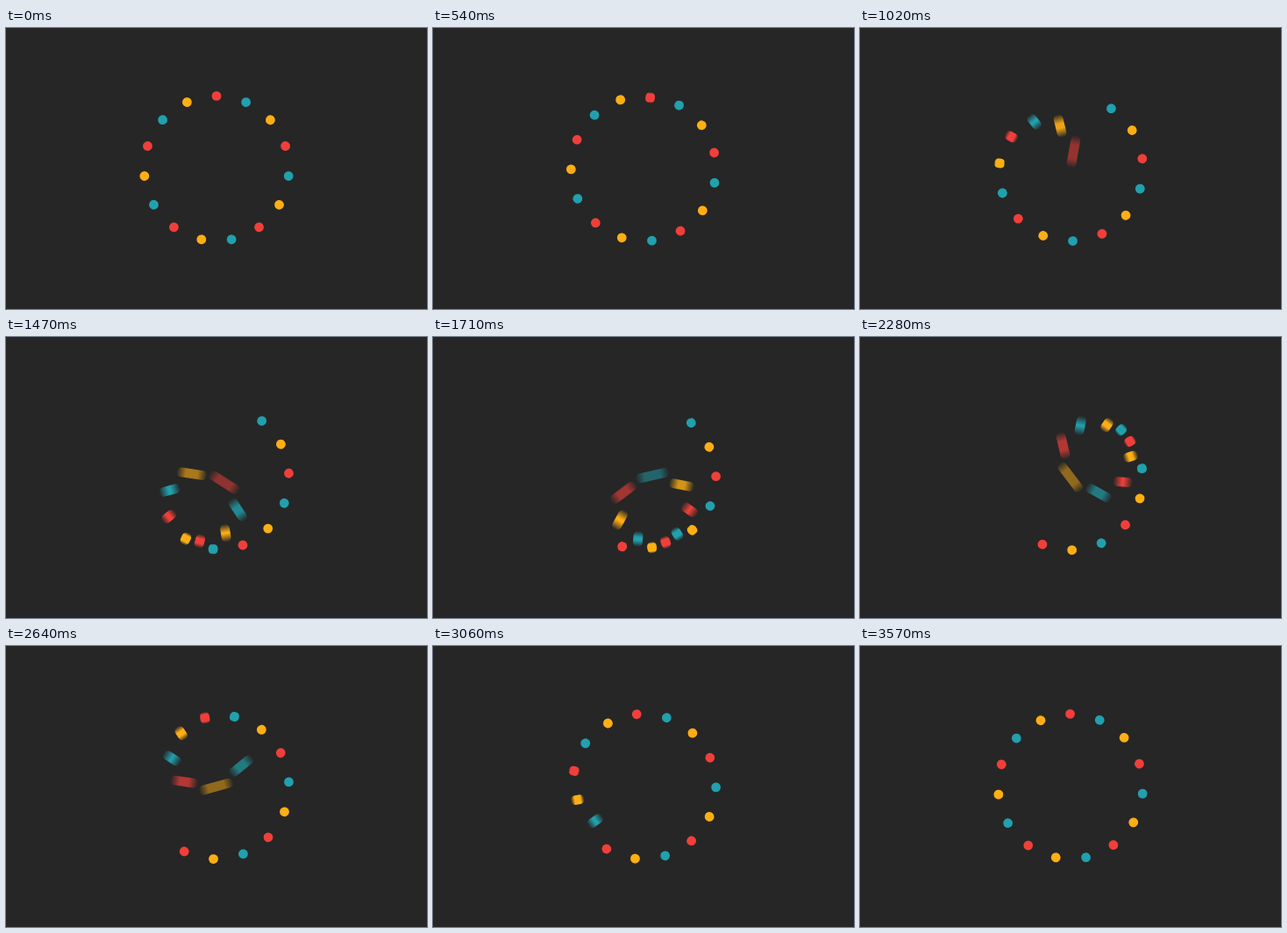
Recreate the animation shown at these times as an HTML page with a canvas. Size 480 by 320 pixels, loop 3.6 s.

```html
<!DOCTYPE html>
<html lang="en">
<head>
<meta charset="utf-8">
<title>Dot ring</title>
<style>
  html, body { margin: 0; width: 100%; height: 100%; overflow: hidden; background: #262626; }
  canvas { display: block; width: 480px; height: 320px; }
</style>
</head>
<body>
<canvas id="stage"></canvas>
<script>
const LOOP = 3600, COUNT = 15, RING = 82.6, DOT = 5.4;
const FIRST = 1080, STAGGER = 120, CROSSING = 1340, EASE = 0.655;
const SHUTTER = 84, GAIN = 1.35;
const COLORS = ['240,63,58', '255,174,20', '33,160,173'];

const canvas = document.getElementById('stage');
const ctx = canvas.getContext('2d');
const dpr = window.devicePixelRatio || 1;
canvas.width = 480 * dpr;
canvas.height = 320 * dpr;

// cubic-bezier(EASE, 0, 1 - EASE, 1)
function ease(x) {
  if (x <= 0) return 0;
  if (x >= 1) return 1;
  let lo = 0, hi = 1;
  for (let i = 0; i < 24; i++) {
    const u = (lo + hi) / 2, v = 1 - u;
    const bx = 3 * u * v * (v * EASE + u * (1 - EASE)) + u * u * u;
    if (bx < x) lo = u; else hi = u;
  }
  return lo * lo * (3 - 2 * lo);
}

// Signed distance from the centre: +RING before crossing, -RING after.
function distance(k, t) {
  const x = (t - FIRST - k * STAGGER) / CROSSING + 0.5;
  return RING * (1 - 2 * ease(x));
}

// A dot smeared along its spoke; the spoke points up in local space.
function drawDot(rgb, from, to) {
  const mid = (from + to) / 2, len = Math.abs(from - to);
  const half = len / 2 + DOT;
  const peak = Math.min(1, GAIN * 2 * DOT / Math.max(len, 0.01));
  const ramp = Math.min(len, 2 * DOT) / (2 * half);
  if (len < 0.2) {
    ctx.fillStyle = `rgb(${rgb})`;
  } else {
    const fade = ctx.createLinearGradient(0, -mid - half, 0, -mid + half);
    const clear = `rgba(${rgb},0)`, solid = `rgba(${rgb},${peak})`;
    fade.addColorStop(0, clear);
    fade.addColorStop(ramp, solid);
    fade.addColorStop(1 - ramp, solid);
    fade.addColorStop(1, clear);
    ctx.fillStyle = fade;
  }
  ctx.beginPath();
  ctx.arc(0, -mid - len / 2, DOT, Math.PI, 0);
  ctx.arc(0, -mid + len / 2, DOT, 0, Math.PI);
  ctx.closePath();
  ctx.fill();
}

function draw(t) {
  ctx.setTransform(dpr, 0, 0, dpr, 0, 0);
  ctx.fillStyle = '#262626';
  ctx.fillRect(0, 0, 480, 320);
  ctx.translate(240, 160);
  // 36 degrees of turn plus the crossing lands each dot on a matching colour.
  ctx.rotate(t / LOOP * Math.PI / 5);
  for (let k = 0; k < COUNT; k++) {
    drawDot(COLORS[k % 3], distance(k, t - SHUTTER / 2), distance(k, t + SHUTTER / 2));
    ctx.rotate(-2 * Math.PI / COUNT);
  }
}

const start = performance.now();
function tick() {
  draw((performance.now() - start) % LOOP);
  requestAnimationFrame(tick);
}
tick();
</script>
</body>
</html>
```
